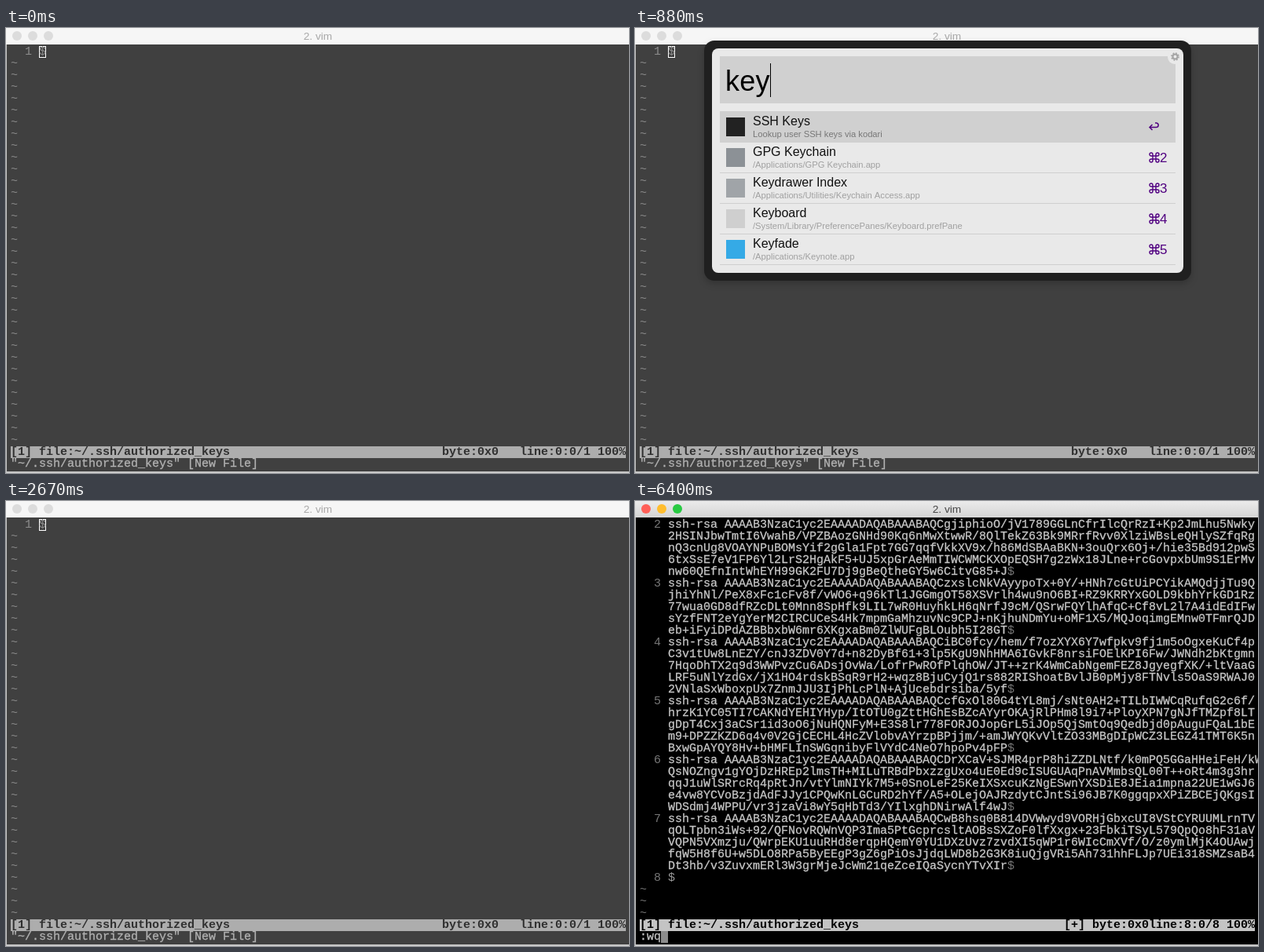
Recreate the animation shown at these times as an HTML page. Size 793 by 567 pixels, loop 8.95 s.

```html
<!DOCTYPE html>
<html lang="en">
<head>
<meta charset="utf-8">
<title>SSH key lookup</title>
<style>
html, body { margin: 0; width: 100%; height: 100%; overflow: hidden; background: #c8c8c8; }
svg { display: block; width: 100%; height: 100%; }
text { white-space: pre; font-kerning: none; }
.mono { font: 15px "Liberation Mono", "Courier New", monospace; }
.bold { font-weight: bold; }
.ui { font-family: "Liberation Sans", Arial, sans-serif; }
.query { font-size: 36px; letter-spacing: .25px; }
.name { font-size: 16px; }
.sub { font-size: 11.2px; }
.key { font-size: 17px; }
.ring { filter: drop-shadow(0 4px 4px rgba(0, 0, 0, .2)); }
</style>
</head>
<body>
<svg id="stage" viewBox="0 0 793 567"></svg>
<script>
const LOOP = 8950;
const HEAD = 'ssh-rsa AAAAB3NzaC1yc2EAAAADAQABAAABAQC';
const KEYS = [
  ['gjiphioO/jV1789GGLnCfrIlcQrRzI+Kp2JmLhu5Nwky',
   '2HSINJbwTmtI6VwahB/VPZBAozGNHd90Kq6nMwXtwwR/8QlTekZ63Bk9MRrfRvv0XlziWBsLeQHlySZfqRg',
   'nQ3cnUg8VOAYNPuBOMsYif2gGla1Fpt7GG7qqfVkkXV9x/h86MdSBAaBKN+3ouQrx6Oj+/hie35Bd912pwS',
   '6txSsE7eV1FP6Yl2LrS2HgAkF5+UJ5xpGrAeMmTIWCWMCKXOpEQSH7g2zWx18JLne+rcGovpxbUm9S1ErMv',
   'nw60QEfnIntWhEYH99GK2FU7Dj9gBeQtheGY5w6CitvG85+J'],
  ['zxslcNkVAyypoTx+0Y/+HNh7cGtUiPCYikAMQdjjTu9Q',
   'jhiYhNl/PeX8xFc1cFv8f/vWO6+q96kTl1JGGmgOT58XSVrlh4wu9nO6BI+RZ9KRRYxGOLD9kbhYrkGD1Rz',
   '77wua0GD8dfRZcDLt0Mnn8SpHfk9LIL7wR0HuyhkLH6qNrfJ9cM/QSrwFQYlhAfqC+Cf8vL2l7A4idEdIFw',
   'sYzfFNT2eYgYerM2CIRCUCeS4Hk7mpmGaMhzuvNc9CPJ+nKjhuNDmYu+oMF1X5/MQJoqimgEMnw0TFmrQJD',
   'eb+iFyiDPdAZBBbxbW6mr6XKgxaBm0ZlWUFgBLOubh5I28GT'],
  ['iBC0fcy/hem/f7ozXYX6Y7wfpkv9fj1m5oOgxeKuCf4p',
   'C3v1tUw8LnEZY/cnJ3ZDV0Y7d+n82DyBf61+3lp5KgU9NhHMA6IGvkF8nrsiFOElKPI6Fw/JWNdh2bKtgmn',
   '7HqoDhTX2q9d3WWPvzCu6ADsjOvWa/LofrPwROfPlqhOW/JT++zrK4WmCabNgemFEZ8JgyegfXK/+ltVaaG',
   'LRF5uNlYzdGx/jX1HO4rdskBSqR9rH2+wqz8BjuCyjQ1rs882RIShoatBvlJB0pMjy8FTNvls5OaS9RWAJ0',
   '2VNlaSxWboxpUx7ZnmJJU3IjPhLcPlN+AjUcebdrsiba/5yf'],
  ['cfGxOl80G4tYL8mj/sNt0AH2+TILbIWWCqRufqG2c6f/',
   'hrzK1YC05TI7CAKNdYEHIYHyp/ItOTU0gZttHGhEsBZcAYyrOKAjRlPHm8l9i7+PloyXPN7gNJfTMZpf8LT',
   'gDpT4Cxj3aCSr1id3oO6jNuHQNFyM+E3S8lr778FORJOJopGrL5iJOp5QjSmtOq9Qedbjd0pAuguFQaL1bE',
   'm9+DPZZKZD6q4v0V2GjCECHL4HcZVlobvAYrzpBPjjm/+amJWYQKvVltZO33MBgDIpWCZ3LEGZ41TMT6K5n',
   'BxwGpAYQY8Hv+bHMFLInSWGqnibyFlVYdC4NeO7hpoPv4pFP'],
  ['DrXCaV+SJMR4prP8hiZZDLNtf/k0mPQ5GGaHHeiFeH/kW',
   'QsNOZngv1gYOjDzHREp2lmsTH+MILuTRBdPbxzzgUxo4uE0Ed9cISUGUAqPnAVMmbsQL00T++oRt4m3g3hr',
   'qqJ1uWlSRrcRq4pRtJn/vtYlmNIYk7M5+0SnoLeF25KeIXSxcuKzNgESwnYXSDiE8JEia1mpna22UE1wGJ6',
   'e4vw8YCVoBzjdAdFJJy1CPQwKnLGCuRD2hYf/A5+OLejOAJRzdytCJntSi96JB7K0ggqpxXPiZBCEjQKgsI',
   'WDSdmj4WPPU/vr3jzaVi8wY5qHbTd3/YIlxghDNirwAlf4wJ'],
  ['wB8hsq0B814DVWwyd9VORHjGbxcUI8VStCYRUUMLrnTV',
   'qOLTpbn3iWs+92/QFNovRQWnVQP3Ima5PtGcprcsltAOBsSXZoF0lfXxgx+23FbkiTSyL579QpQo8hF31aV',
   'VQPN5VXmzju/QWrpEKU1uuRHd8erqpHQemY0YU1DXzUvz7zvdXI5qWP1r6WIcCmXVf/O/z0ymlMjK4OUAwj',
   'fqW5H8f6U+w5DLO8RPa5ByEEgP3gZ6gPiOsJjdqLWD8b2G3K8iuQjgVRi5Ah731hhFLJp7UEi318SMZsaB4',
   'Dt3hb/v3ZuvxmERl3W3grMjeJcWm21qeZceIQaSycnYTvXIr']
];

const DARK = '#222';
const app = (name, path, color) => ({ name, sub: path, color });
const sshKeys = app('SSH Keys', 'Lookup user SSH keys via kodari', DARK);
const keyboard = app('Keyboard', '/System/Library/PreferencePanes/Keyboard.prefPane', '#cfcfcf');
const apps = [
  sshKeys,
  app('GPG Keychain', '/Applications/GPG Keychain.app', '#8c9196'),
  app('Keydrawer Index', '/Applications/Utilities/Keychain Access.app', '#a0a4a8'),
  keyboard,
  app('Keyfade', '/Applications/Keynote.app', '#35aae6')
];
const extra = ['Kettle', 'Kernel Log', 'Kerning'].map(n => app(n, `/Applications/${n}.app`, '#aaa'));
const users = ['tup', 'tupzarko', 'Tilo-Brekner', 'plommeka', 'knofelwurbitzen',
  'herdomin-gaber', 'kytup', 'TupZenBucket', 'MelotTup']
  .map(n => app(n, `Copy SSH keys for ${n} to clipboard`, DARK));

// Each step changes only the named parts of the state.
const STEPS = [
  [0, { pop: 0, query: '', rows: [], caret: true, live: false, pasted: false,
        cmd: '"~/.ssh/authorized_keys" [New File]' }],
  [140, { pop: .5 }],
  [290, { pop: .97 }],
  [580, { pop: 1, query: 'ke', rows: [...apps, ...extra] }],
  [730, { rows: [...apps, extra[2]] }],
  [880, { query: 'key', rows: apps }],
  [1030, { query: 'keys', rows: [sshKeys, keyboard] }],
  [1180, { query: 'keys t', rows: [sshKeys] }],
  [1330, { query: 'keys tu' }],
  [1480, { query: 'keys tup' }],
  [1920, { rows: users }],
  [2070, { caret: false }],
  [2520, { caret: true }],
  [2670, { pop: 0 }],
  [4160, { live: true }],
  [4310, { cmd: '-- INSERT --' }],
  [4610, { pasted: true }],
  [5650, { cmd: '' }],
  [5950, { cmd: ':' }],
  [6250, { cmd: ':w' }],
  [6400, { cmd: ':wq' }]
];

const rect = (x, y, w, h, fill, more = '') =>
  `<rect x="${x}" y="${y}" width="${w}" height="${h}" fill="${fill}" ${more}/>`;
const text = (x, y, cls, fill, str, more = '') =>
  `<text x="${x}" y="${y}" class="${cls}" fill="${fill}" ${more}>${str}</text>`;
const colX = c => 6 + 9 * c;
const rowY = r => 23 + 15 * r;
const cell = (r, c, fill, str, cls = '') => text(colX(c), rowY(r) + 11, 'mono ' + cls, fill, str);
const thick = (r, c, fill, str) =>
  text(colX(c), rowY(r) + 11, 'mono', fill, str, `stroke="${fill}" stroke-width=".3"`);

function titleBar(live) {
  const lights = live ? ['#ff5f57', '#ffbd2e', '#28ca42'] : ['#dcdcdc', '#dcdcdc', '#dcdcdc'];
  return rect(0, 0, 793, 21, live ? 'url(#bar)' : '#f6f6f6') +
    lights.map((c, i) => `<circle cx="${14 + 20 * i}" cy="10" r="6" fill="${c}"/>`).join('') +
    text(397, 15, 'ui', live ? '#444' : '#a8a8a8', '2. vim', 'text-anchor="middle" font-size="13.7"');
}

function blockCursor(r, live) {
  return live
    ? rect(42, rowY(r), 9, 15, '#fff') + cell(r, 4, '#000', '$')
    : rect(42.5, rowY(r) + .5, 8, 14, 'none', 'stroke="#fff"') + cell(r, 4, '#8c8c8c', '$');
}

function keyLines(ink, dim) {
  let out = '';
  KEYS.forEach((lines, k) => {
    out += cell(k * 5, 2, dim, k + 2);
    lines.forEach((line, i) => {
      out += thick(k * 5 + i, 4, ink, i ? line : HEAD + line);
    });
    out += cell(k * 5 + 4, 4 + lines[4].length, dim, '$');
  });
  return out + cell(30, 2, dim, 8);
}

function terminal({ live, pasted, cmd }) {
  const ink = live ? '#c6c6c6' : '#b2b2b2';
  const dim = live ? '#777' : '#8c8c8c';
  const status = live ? '#000' : '#303030';
  const last = pasted ? 30 : 0;
  const typing = cmd[0] === ':';
  let out = rect(1, 21, 792, 544, live ? '#000' : '#404040');
  out += pasted ? keyLines(ink, dim) : cell(0, 2, dim, 1);
  out += typing ? cell(last, 4, '#999', '$') : blockCursor(last, live);
  for (let r = last + 1; r < 34; r++) out += cell(r, 0, dim, '~');
  out += rect(6, rowY(34), 783, 15, live ? '#c4c4c4' : '#adadad');
  const put = (c, str) => { out += cell(34, c, status, str, 'bold'); };
  put(0, '[1] file:~/.ssh/authorized_keys');
  put(pasted ? 60 : 61, pasted ? '[+] byte:0x0' : 'byte:0x0');
  put(72, pasted ? 'line:8:0/8 100%' : 'line:0:0/1 100%');
  out += thick(35, 0, ink, cmd);
  if (typing) out += rect(colX(cmd.length), rowY(35), 9, 15, '#8c8c8c');
  return out;
}

const COMMAND = 'M5 5H3a2 2 0 1 1 2-2v8a2 2 0 1 1-2-2h8a2 2 0 1 1-2 2V3a2 2 0 1 1 2 2z';
const RETURN = 'M1 7.5h8.5a2.7 2.7 0 0 0 0-5.4H8M4.5 4L1 7.5 4.5 11';
const PURPLE = '#500080';

function resultRow({ name, sub, color }, i, right) {
  const y = 106 + 39 * i;
  const glyph = i
    ? `<path d="${COMMAND}" transform="translate(654 ${y + 13})" fill="none" stroke="${PURPLE}" stroke-width="1.4"/>` +
      text(668, y + 26, 'ui key', PURPLE, i + 1)
    : `<path d="${RETURN}" transform="translate(654 ${y + 13})" transform-origin="0 0" fill="none" stroke="${PURPLE}" stroke-width="1.5"/>`;
  return (i ? rect(108, y + 39, right - 108, 1, '#cfcfcf') : rect(108, y, right - 108, 40, '#d0d0d0')) +
    rect(116, y + 8, 24, 24, color) +
    text(150, y + 18, 'ui name', '#111', name) +
    text(150, y + 33, 'ui sub', i ? '#a0a0a0' : '#777', sub) + glyph;
}

function popup({ pop, query, rows, caret }) {
  if (!pop) return '';
  const bottom = rows.length ? 117 + 39 * rows.length : 106;
  const scroll = rows.length > 8;
  const right = scroll ? 684 : 688;
  return `<g opacity="${pop}">` +
    rect(88, 16, 620, bottom - 6, '#202020', 'rx="13" class="ring"') +
    rect(98, 26, 600, bottom - 26, '#e9e9e9', 'rx="8"') +
    rect(108, 36, 580, 60, '#d0d0d0') +
    '<circle cx="687" cy="37" r="9" fill="#e9e9e9"/>' +
    '<g fill="none" stroke="#a4a4a4"><circle cx="687.5" cy="36.5" r="3" stroke-width="2"/>' +
    '<circle cx="687.5" cy="36.5" r="4.6" stroke-width="1.5" stroke-dasharray="1.9 1.713"/></g>' +
    text(115, 80, 'ui query', '#000', query, 'id="query"') +
    (caret ? rect(115, 45, 1, 43, '#000', 'id="caret"') : '') +
    rows.map((row, i) => resultRow(row, i, right)).join('') +
    (scroll ? rect(686, 106, 2, 317, '#c2c2c2') : '') + '</g>';
}

const stage = document.getElementById('stage');
const DEFS = '<defs><linearGradient id="bar" x2="0" y2="1"><stop stop-color="#ebebeb"/>' +
  '<stop offset="1" stop-color="#d4d4d4"/></linearGradient></defs>';

function draw(index) {
  const state = Object.assign({}, ...STEPS.slice(0, index + 1).map(s => s[1]));
  stage.innerHTML = DEFS + titleBar(state.live) + terminal(state) + popup(state);
  const caret = document.getElementById('caret');
  if (caret && state.query) {
    const width = document.getElementById('query').getComputedTextLength();
    caret.setAttribute('x', 115 + Math.round(width));
  }
}

const start = performance.now();
let shown = -1;
function tick() {
  const t = (performance.now() - start) % LOOP;
  const index = STEPS.filter(s => s[0] <= t).length - 1;
  if (index !== shown) draw(shown = index);
  requestAnimationFrame(tick);
}
tick();
</script>
</body>
</html>
```
